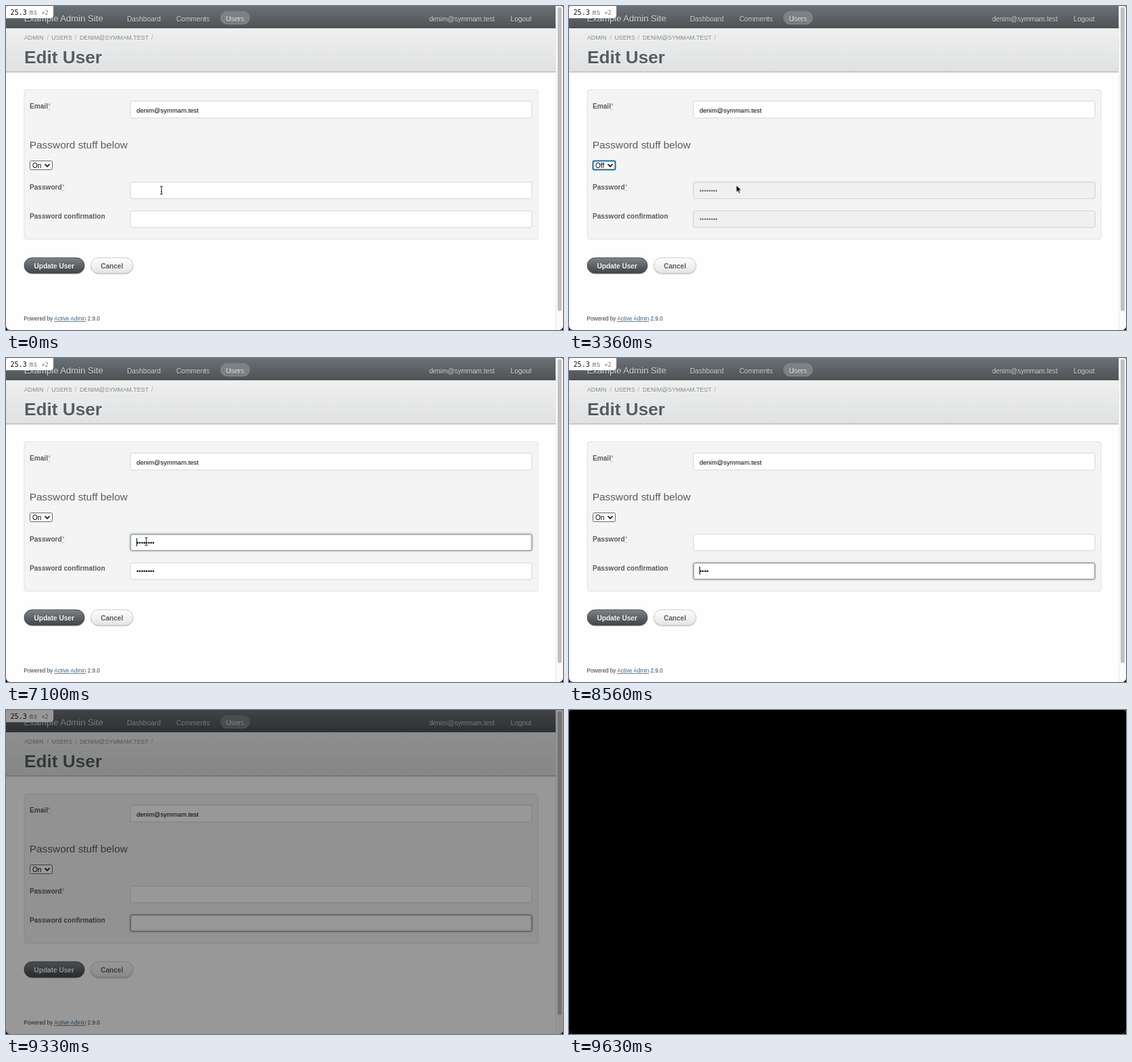
These frames come from a looping animation (824 px wide and 480 px high, 9660 ms). An HTML page:

```html
<!DOCTYPE html>
<html lang="en">
<head>
<meta charset="utf-8">
<title>Edit User</title>
<style>
html, body { margin: 0; width: 100%; height: 100%; overflow: hidden; background: #000; }
.page {
  position: relative; width: 824px; height: 480px; overflow: hidden;
  background: #fefefe; border-radius: 2px 3px 6px 6px;
  font-family: "Liberation Sans", Arial, sans-serif;
}
svg { position: absolute; left: 0; top: 0; font-size: 10.1px; }
.nav { fill: #d8dadb; filter: drop-shadow(0 1px 0 #33373a); }
.crumb { font-size: 8.8px; fill: #79838c; }
.lift { filter: drop-shadow(0 1px 0 #fff); }
.label { font-weight: bold; fill: #575c61; }
.star { font-weight: normal; fill: #999; }
.input { fill: #fff; stroke: #cfd5da; }
.glow { fill: none; stroke: #7f8a92; filter: drop-shadow(0 0 1.5px #99a2aa); }
.mono { font-family: "DejaVu Sans Mono", monospace; }

/* password values */
.value { position: absolute; left: 193px; height: 13px; display: flex; font-size: 9.5px; line-height: 13px; }
.dots { overflow: hidden; white-space: nowrap; height: 13px; }
.caret, .home { width: 1px; height: 12px; background: #000; }
.home { position: absolute; left: 0; top: 0; }
.pw { top: 267px; }
.cf { top: 309px; }

/* one shared clock */
.on, .off, .glow, .ring, .gray, .dots, .caret, .home, .move, .beam, .arrow, .fade {
  animation: 9660ms step-end infinite;
}
.pw .dots { animation-name: pwType, ink; }
.cf .dots { animation-name: cfType, ink; }
.pw .caret { animation-name: pwCaret; }
.cf .caret { animation-name: cfCaret; }
.pw .home { animation-name: pwHome; }
.cf .home { animation-name: cfHome; }
.glow.a { animation-name: pwFocus; }
.glow.b { animation-name: cfFocus; }
.ring { animation-name: ring; }
.on { animation-name: on; }
.off, .gray { animation-name: off; }
.move { animation-name: move; animation-timing-function: ease-in-out; }
.beam { animation-name: beam; }
.arrow { animation-name: arrow; }
.fade { position: absolute; inset: 0; background: #000; animation-name: fade; animation-timing-function: linear; }

@keyframes pwType {
  0% { width: 0; }
  3.11% { width: 0; animation-timing-function: steps(8, start); }
  8.59% { width: 27px; }
  73.81% { width: 27px; animation-timing-function: steps(8); }
  78.99%, 100% { width: 0; }
}
@keyframes cfType {
  0% { width: 0; }
  9.73% { width: 0; animation-timing-function: steps(8, start); }
  16.56% { width: 27px; }
  85.2% { width: 27px; animation-timing-function: steps(8); }
  90.68%, 100% { width: 0; }
}
@keyframes ink { 0%, 61.08%, 100% { color: #000; } 30.02% { color: #6d6d6d; } }
@keyframes pwCaret { 0%, 9.32%, 100% { opacity: 0; } .31% { opacity: 1; } }
@keyframes cfCaret { 0%, 21.74%, 100% { opacity: 0; } 9.32% { opacity: 1; } }
@keyframes pwHome { 0%, 82.09%, 100% { opacity: 0; } 69.36% { opacity: 1; } }
@keyframes cfHome { 0%, 94.82%, 100% { opacity: 0; } 84.89% { opacity: 1; } }
@keyframes pwFocus { 0%, 9.32%, 84.89%, 100% { opacity: 0; } .31%, 69.36% { opacity: 1; } }
@keyframes cfFocus { 0%, 25.88% { opacity: 0; } 9.32%, 84.89%, 100% { opacity: 1; } }
@keyframes ring { 0%, 69.36%, 100% { opacity: 0; } 25.88% { opacity: 1; } }
@keyframes on { 0%, 61.08%, 100% { opacity: 1; } 30.02% { opacity: 0; } }
@keyframes off { 0%, 61.08%, 100% { opacity: 0; } 30.02% { opacity: 1; } }
@keyframes move {
  0%, 17.6% { transform: translate(230px, 273px); }
  25.16%, 26.5% { transform: translate(55px, 236px); }
  28.5%, 30.02% { transform: translate(54px, 252px); }
  34.2%, 40.99% { transform: translate(247.5px, 265.5px); }
  47.2%, 48.65% { transform: translate(312px, 307px); }
  57.5%, 61.08% { transform: translate(52px, 235px); }
  68.63%, 81.06% { transform: translate(207.5px, 272px); }
  84.2%, 100% { transform: translate(207.5px, 315px); }
}
@keyframes beam {
  0%, 17.6%, 66.46%, 81.06% { opacity: 1; }
  3.11%, 20.19%, 73.81%, 85.2%, 100% { opacity: 0; }
}
@keyframes arrow { 0%, 66.46%, 100% { opacity: 0; } 20.19% { opacity: 1; } }
@keyframes fade { 0%, 94.51% { opacity: 0; } 99.69%, 100% { opacity: 1; } }
</style>
</head>
<body>
<div class="page">
  <svg width="824" height="480">
    <defs>
      <linearGradient id="bar" x2="0" y2="1"><stop stop-color="#6a7176"/><stop offset="1" stop-color="#4d5256"/></linearGradient>
      <linearGradient id="head" x2="0" y2="1"><stop stop-color="#efefef"/><stop offset="1" stop-color="#dfe1e2"/></linearGradient>
      <linearGradient id="dark" x2="0" y2="1"><stop stop-color="#7d8389"/><stop offset="1" stop-color="#414549"/></linearGradient>
      <linearGradient id="light" x2="0" y2="1"><stop stop-color="#fff"/><stop offset="1" stop-color="#e4e4e4"/></linearGradient>
    </defs>

    <rect y="33" width="813" height="64" fill="url(#head)" style="filter:drop-shadow(0 1px 1px #bbb)"/>
    <path d="M0 97.5H813" stroke="#b3b6b8"/>
    <rect width="813" height="33" fill="url(#bar)"/>
    <rect x="317" y="7.5" width="44" height="20" rx="10" fill="#7c8186"/>
    <g class="nav">
      <text x="26.5" y="22.5" font-size="13.1">Example Admin Site</text>
      <g font-size="10.2">
        <text x="179" y="22.5">Dashboard</text>
        <text x="252" y="22.5">Comments</text>
        <text x="325.5" y="22.5" fill="#fff">Users</text>
        <text x="746.5" y="22.5">Logout</text>
      </g>
      <text x="626" y="22.5" font-size="10">denim@symmam.test</text>
    </g>
    <g class="crumb lift">
      <text x="27" y="50">ADMIN</text>
      <text x="60.5" y="50" fill="#9aa3aa">/</text>
      <text x="67.5" y="50">USERS</text>
      <text x="102" y="50" fill="#9aa3aa">/</text>
      <text x="109" y="50">DENIM@SYMMAM.TEST</text>
      <text x="215" y="50" fill="#9aa3aa">/</text>
    </g>
    <text class="label lift" x="27" y="84.5" font-size="26.2">Edit User</text>

    <rect x="27" y="124" width="760" height="221.5" rx="3" fill="#f4f4f4" stroke="#e1e3e6"/>
    <g class="label">
      <text x="35" y="152">Email<tspan class="star">*</tspan></text>
      <text x="35" y="272">Password<tspan class="star">*</tspan></text>
      <text x="35" y="314.5">Password confirmation</text>
    </g>
    <path d="M62 153.5h4M83 273.5h4" stroke="#999" stroke-dasharray="1 1"/>
    <text x="34.8" y="211" font-size="15.4" fill="#575c61">Password stuff below</text>

    <rect class="input" x="184" y="141" width="594" height="25" rx="2.5"/>
    <rect class="input" x="184" y="261" width="594" height="24.5" rx="2.5"/>
    <rect class="input" x="184" y="303.5" width="594" height="24.5" rx="2.5"/>
    <g class="gray" fill="#f0f0f0" stroke="#cfd5da">
      <rect x="184" y="261" width="594" height="24.5" rx="2.5"/>
      <rect x="184" y="303.5" width="594" height="24.5" rx="2.5"/>
    </g>
    <rect class="glow a" x="184" y="261" width="594" height="24.5" rx="2.5"/>
    <rect class="glow b" x="184" y="303.5" width="594" height="24.5" rx="2.5"/>
    <text x="193" y="157.5" font-size="9.5">denim@symmam.test</text>

    <rect x="35.5" y="229.5" width="33" height="13" rx="2" fill="#fff" stroke="#666"/>
    <rect class="ring" x="35.5" y="229.5" width="33" height="13" rx="2" fill="none" stroke="#1c6a94" stroke-width="2"/>
    <text class="on" x="39" y="240">On</text>
    <text class="off" x="39" y="240">Off</text>
    <path d="M57.5 234.3l3.5 3.5 3.5-3.5" fill="none" stroke="#000" stroke-width="1.6"/>

    <rect x="27" y="373" width="89" height="23" rx="11.5" fill="url(#dark)" stroke="#484c50" style="filter:drop-shadow(0 1px 0.5px #ccc)"/>
    <rect x="125.5" y="373" width="62.5" height="23" rx="11.5" fill="url(#light)" stroke="#c9c9c9" style="filter:drop-shadow(0 1px 0.5px #ccc)"/>
    <g font-weight="bold" text-anchor="middle">
      <text x="71.2" y="388.5" fill="#fff" style="filter:drop-shadow(0 1px 0 #333)">Update User</text>
      <text class="lift" x="156.7" y="388.5" fill="#575c61">Cancel</text>
    </g>
    <text x="26.3" y="466" font-size="8.17" fill="#3c3c3c">Powered by <tspan fill="#38678b" text-decoration="underline">Active Admin</tspan> 2.9.0</text>

    <rect x="813" width="11" height="480" fill="#fafafa"/>
    <path d="M813.5 0V480" stroke="#e8e8e8"/>
    <rect x="816" y="2" width="6" height="450" rx="3" fill="#c1c1c1"/>

    <path d="M0 0H70V13q0 5-5 5H0z" fill="#fff" style="filter:drop-shadow(0 0 1px #999)"/>
    <g class="mono" fill="#777">
      <text x="6.5" y="13" fill="#111">25.3</text>
      <text x="34.5" y="13" font-size="10">ms</text>
      <text x="52.5" y="13" font-size="8.5">×2</text>
    </g>
  </svg>

  <div class="value pw"><div class="dots">••••••••</div><div class="caret"></div><div class="home"></div></div>
  <div class="value cf"><div class="dots">••••••••</div><div class="caret"></div><div class="home"></div></div>

  <svg width="824" height="480">
    <g class="move">
      <path class="beam" d="M-2-6Q0-6 0-4.5V4.5Q0 6-2 6M2-6Q0-6 0-4.5M0 4.5Q0 6 2 6M-1 2H1" fill="none" stroke="#111"/>
      <path class="arrow" d="M0 0V10.5L2.4 8.3 4.1 12.2 6 11.4 4.3 7.6H7.6Z" stroke="#fff" stroke-width=".8"/>
    </g>
  </svg>
  <div class="fade"></div>
</div>
</body>
</html>
```
